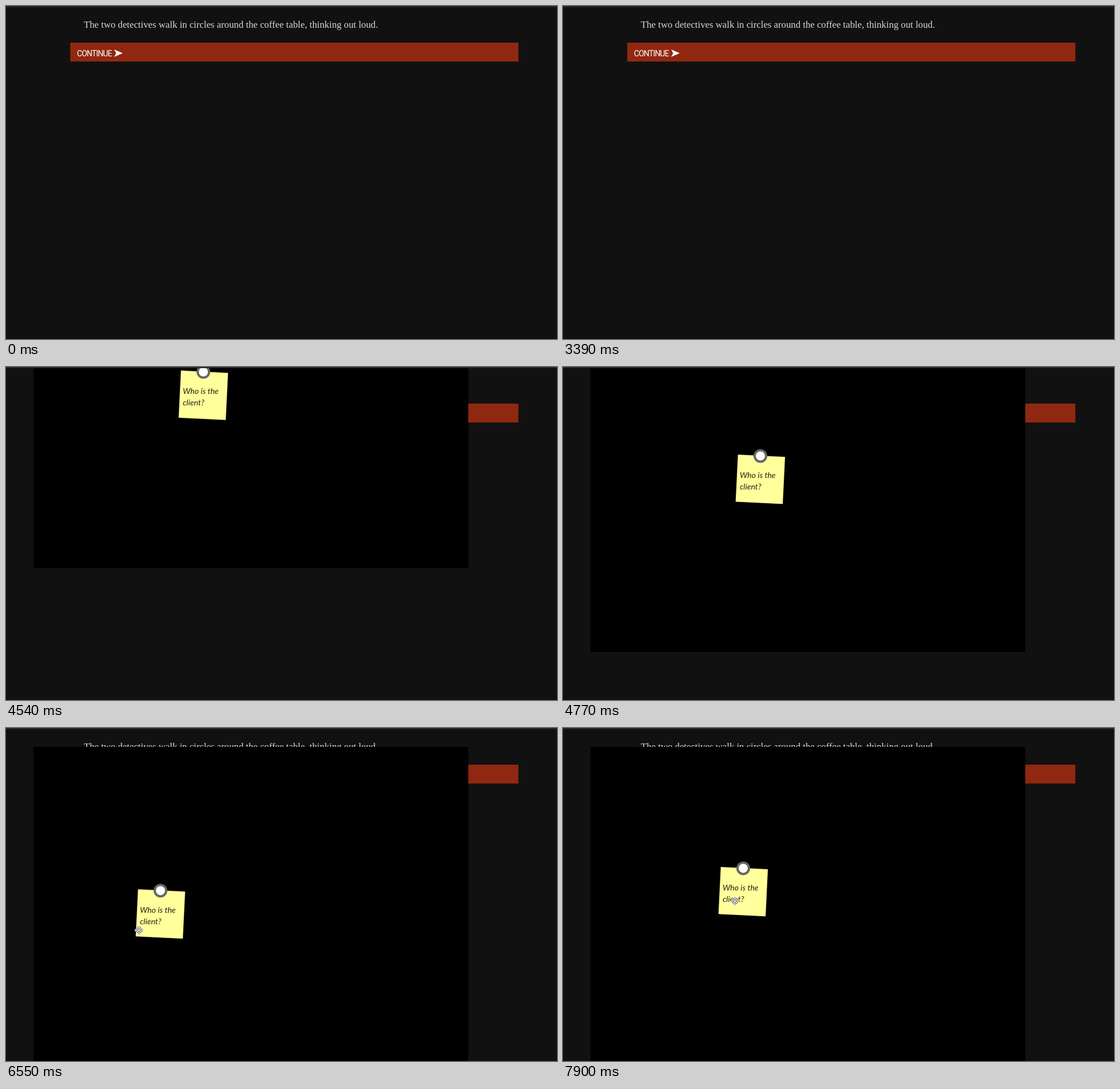
An HTML page with a canvas for the animation above (8 s loop, 963 by 582 pixels).

```html
<!DOCTYPE html>
<html lang="en">
<head>
<meta charset="utf-8">
<title>Detectives</title>
<style>
html, body { margin: 0; width: 100%; height: 100%; overflow: hidden; background: #111; }
canvas { display: block; }
</style>
</head>
<body>
<canvas id="stage" width="963" height="582"></canvas>
<script>
const ctx = document.getElementById('stage').getContext('2d');
const W = 963, H = 582, LOOP = 8000;
const GRAB = 6400, DROP = 6670, REGRAB = 7000;

// easings
const smooth = u => u * u * (3 - 2 * u);
const out = u => 1 - (1 - u) ** 2;
const back = u => 1 + 2.5 * (u - 1) ** 3 + 1.5 * (u - 1) ** 2;

// the pointer rests between moves; bow bends a move sideways
const moves = [
  { from: 230, to: 730, x: 458, y: 322, ease: out },
  { from: 1215, to: 1520, x: 570, y: 217, ease: smooth },
  { from: 2130, to: 2510, x: 589, y: 157, ease: smooth, bow: -28 },
  { from: 2820, to: 3450, x: -60, y: 370, ease: smooth },
  { from: 5600, to: 6280, x: 307, y: 308, ease: back },
  { from: GRAB, to: DROP, x: 180, y: 385, ease: smooth },
  { from: 6880, to: REGRAB, x: 203, y: 373, ease: smooth },
  { from: REGRAB, to: 7290, x: 359, y: 252, ease: smooth },
  { from: 7290, to: 7900, x: 300, y: 302, ease: back }
];

function pointerAt(t) {
  let x = 960, y = 620;
  for (const m of moves) {
    if (t < m.from) break;
    const u = Math.min(1, (t - m.from) / (m.to - m.from)), k = m.ease(u);
    x += (m.x - x) * k + (m.bow || 0) * Math.sin(Math.PI * u);
    y += (m.y - y) * k;
  }
  return [Math.round(x), Math.round(y)];
}

// while held, the note follows the pointer
function noteOffset(t) {
  const since = (a, b) => pointerAt(b).map((v, i) => v - pointerAt(a)[i]);
  const first = since(GRAB, Math.max(GRAB, Math.min(t, DROP)));
  const second = since(REGRAB, Math.max(REGRAB, t));
  return first.map((v, i) => v + second[i]);
}

function rect(x, y, w, h, color) {
  ctx.fillStyle = color;
  ctx.fillRect(x, y, w, h);
}

function text(str, x, y, font, color, spacing = '0px') {
  ctx.font = font;
  ctx.letterSpacing = spacing;
  ctx.fillStyle = color;
  ctx.fillText(str, x, y);
}

function poly(points, color) {
  ctx.beginPath();
  points.forEach(([x, y]) => ctx.lineTo(x, y));
  ctx.closePath();
  ctx.fillStyle = color;
  ctx.fill();
}

function outline(color, width) {
  ctx.strokeStyle = color;
  ctx.lineWidth = width;
  ctx.stroke();
}

function disc(x, y, r, color) {
  ctx.beginPath();
  ctx.arc(x, y, r, 0, Math.PI * 2);
  ctx.fillStyle = color;
  ctx.fill();
}

function drawPage() {
  rect(0, 0, W, H, '#111');
  text('The two detectives walk in circles around the coffee table, thinking out loud.',
    136, 38, '16.75px "Liberation Serif", serif', '#d9d9d2');
  rect(112.3, 64, 783.2, 33, '#902811');
  text('CONTINUE', 124, 88, '14px Roboto, sans-serif', '#fff', '-0.85px');
  poly([[189, 76], [204, 82.5], [189, 89], [192.5, 82.5]], '#fff');
}

function drawNote(dx, dy) {
  const font = 'italic 14px Lato, sans-serif', ink = '#222211';
  ctx.save();
  ctx.translate(dx, dy);
  ctx.save();
  ctx.translate(344.9, 280.1);
  ctx.rotate(0.0485);
  rect(-41.3, -41.3, 82.6, 82.6, '#d6d682');
  rect(-40.7, -40.7, 81.4, 81.4, '#ffff9b');
  ctx.restore();
  text('Who is the', 309, 278, font, ink);
  text('client?', 309, 298, font, ink);
  disc(345, 239.2, 12, '#666');
  disc(345, 239.2, 8, '#fff');
  ctx.restore();
}

function drawBoard(t) {
  const left = Math.max(0, 1 - (t - 4140) / 865);
  ctx.save();
  ctx.translate(0, -580 * left ** 1.48);
  rect(48, 33, 760, 549, '#000');
  drawNote(...noteOffset(t));
  ctx.restore();
}

function drawArrow(x, y) {
  ctx.save();
  ctx.translate(x + 0.6, y);
  poly([[0, 0], [0, 10], [2.3, 7.9], [3.8, 11.3], [5.5, 10.6], [4, 7.3], [7, 7]], '#fff');
  outline('#000', 0.5);
  ctx.restore();
}

function drawMove(x, y) {
  const arm = [[-1, -1], [-1, -4], [-3, -4], [0, -7], [3, -4], [1, -4]];
  const cross = [0, 1, 2, 3].flatMap(q => {
    const c = Math.round(Math.cos(q * Math.PI / 2)), s = Math.round(Math.sin(q * Math.PI / 2));
    return arm.map(([a, b]) => [a * c - b * s, a * s + b * c]);
  });
  ctx.save();
  ctx.translate(x + 0.5, y + 0.5);
  poly(cross, '#fff');
  outline('#fff', 1.8);
  outline('#333', 0.8);
  ctx.restore();
}

function draw(t) {
  const [x, y] = pointerAt(t);
  drawPage();
  if (t >= 4140) drawBoard(t);
  if (t >= 5690) (x > 304 || t >= GRAB ? drawMove : drawArrow)(x, y);
  else if (t >= 330 && t < 3390) drawArrow(x, y);
  rect(0, 0, W, 2, '#27272c');
}

function tick() {
  draw(performance.now() % LOOP);
  requestAnimationFrame(tick);
}
tick();
</script>
</body>
</html>
```
